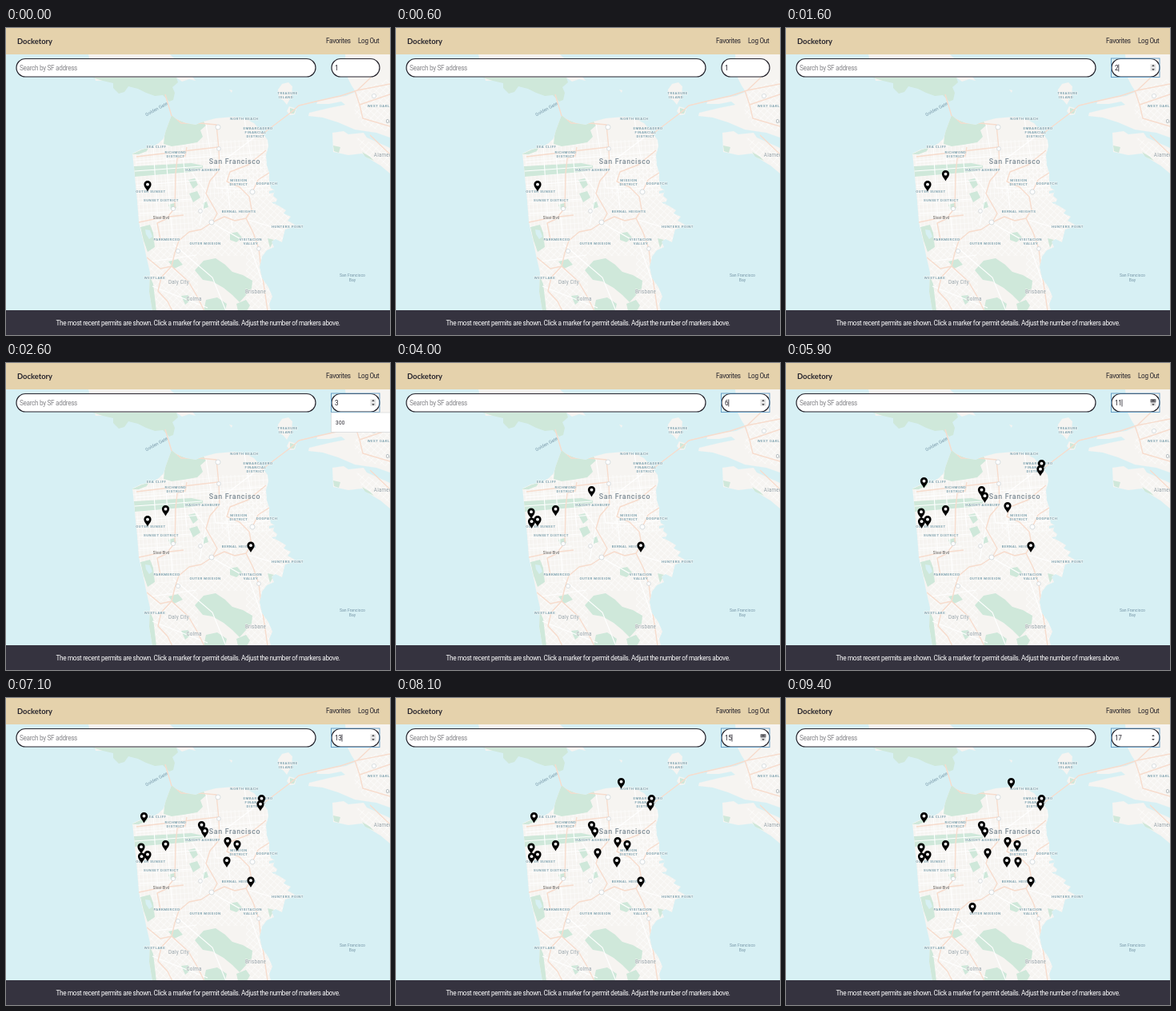
Animation, 480 px wide and 384 px high, one loop 9.5 s. Source, as an HTML page:

```html
<!DOCTYPE html>
<html lang="en">
<head>
<meta charset="utf-8">
<title>Permit map</title>
<style>
  html, body { margin: 0; width: 100%; height: 100%; overflow: hidden; background: #d7f0f4; }
  svg { display: block; width: 480px; height: 384px; font-family: Roboto, "Liberation Sans", sans-serif; }
  .land { fill: #f6f4f1; }
  .park { fill: #cfe8da; }
  .water { fill: #d7f0f4; }
  .street { fill: none; stroke: #fff; stroke-width: 1.1; }
  .road { fill: none; stroke: #f7dccd; stroke-width: 1.4; stroke-linejoin: round; }
  .shield { fill: #fff; stroke: #c3cbd0; stroke-width: .6; }
  .area { font-size: 4.4px; font-weight: 500; letter-spacing: .5px; fill: #6f97a6; }
  .town { font-size: 6.3px; letter-spacing: .2px; fill: #98a3a9; }
  .city { font-size: 8.8px; font-weight: 500; letter-spacing: .7px; fill: #7d8b95; }
  .sea { font-size: 5.1px; fill: #7797a8; }
  .halo text { text-anchor: middle; paint-order: stroke; stroke: #f8f7f5; stroke-width: .9px; }
  .halo .sea { stroke: none; }
  .field { fill: #fff; stroke: #25232c; stroke-width: 1.2; }
  .ui { font-size: 8.2px; letter-spacing: -.31px; fill: #25232c; }
  .brand { font: 700 9.4px Lato, "Open Sans", sans-serif; fill: #25232c; }
</style>
</head>
<body>
<svg viewBox="0 0 480 384" xmlns="http://www.w3.org/2000/svg">
  <defs>
    <path id="city" d="M158 157L168 152 177 150 184 148 191 144 197 138 200 128 204 117 207 109 213 114 225 119 237 121 247 117 262 113 285 111 300 114 310 119 319 129 327 140 328 148 325 159 326 172 329 181 329 192 331 200 336 203 334 210 339 214 336 220 342 223 350 228 347 232 356 236 352 241 361 246 355 250 349 252 347 259 345 268 337 264 332 267 335 274 326 278 320 286 317 299 320 313 328 324 333 336 329 345 331 354H183L179 330 180 306 175 284 171 264 166 243 164 216 161 186 159 166Z"/>
    <clipPath id="inCity"><use href="#city"/></clipPath>
    <pattern id="grid" width="5" height="7" patternUnits="userSpaceOnUse" patternTransform="rotate(-4)">
      <path d="M0 0H5M0 0V7" stroke="#fff" fill="none"/>
    </pattern>
    <pattern id="slant" width="6" height="6" patternUnits="userSpaceOnUse" patternTransform="rotate(42)">
      <path d="M0 0H6M0 0V6" stroke="#fff" fill="none"/>
    </pattern>
    <g id="pin">
      <path d="M0-.4C-1.1-3.2-4.6-5.8-4.6-9.4A4.6 4.6 0 0 1 4.6-9.4C4.6-5.8 1.1-3.2 0-.4Z"/>
      <circle cy="-9.3" r="1.9" fill="#fff"/>
    </g>
  </defs>

  <rect class="water" width="480" height="384"/>

  <!-- northern headlands and small islands -->
  <path class="land" d="M103 33H205L212 40 226 52 237 66 229 64 220 67 213 62 112 66Z"/>
  <path class="park" d="M108 62H213L215 68 208 74 211 81 209 90 204 92 196 84 186 85 175 81 165 76 153 73 148 80 141 82 134 75 134 69 121 66Z"/>
  <path class="land" d="M345 70L353 68 358 73 357 85 351 96 347 91 341 87 340 77ZM354 98L363 101 361 108 355 109 351 104ZM279 77L283 78 282 81Z"/>
  <path class="park" d="M355 100L362 102 360 107 355 107Z"/>

  <!-- east bay -->
  <path class="land" d="M424 33H480V137L463 131 449 129 436 127 415 118 396 112 378 110 379 106 404 100 424 96 419 92 404 95 388 95 390 91 404 88 425 85 437 80 432 72 427 62Z"/>
  <path class="land" d="M408 131L422 129 428 133 447 131 451 137 480 150V182L468 172 453 163 445 157 428 159 409 155Z"/>
  <path class="park" d="M409 147L418 149 416 156 410 154ZM445 155L455 161 460 166 449 161Z"/>
  <path d="M440 78L480 63V130L448 123 435 106Z" fill="url(#slant)"/>
  <path d="M438 137L480 152V176L445 155Z" fill="url(#slant)"/>

  <use href="#city" class="land"/>
  <g clip-path="url(#inCity)">
    <path d="M155 140H330V212H155ZM160 210H235V275H160Z" fill="url(#grid)"/>
    <path d="M268 160H332V212H268ZM235 212H360V285H235ZM180 275H240V354H180ZM300 285H335V354H300Z" fill="url(#slant)"/>
    <path class="park" d="M207 108L215 115 233 120 247 117 250 122 243 128 246 136 239 143 222 146 207 148 197 145 199 127Z"/>
    <path class="park" d="M157 158L170 152 178 150 176 154 166 158ZM160 173L232 169 246 172V175L232 180 161 186Z"/>
    <path class="park" d="M228 190L236 188 240 196 234 201ZM229 207L239 204 243 212 234 218ZM246 219L251 217 253 224 247 226ZM203 221L211 219 213 225 205 227Z"/>
    <path class="park" d="M168 249L180 246 184 256 186 274 177 280 172 266ZM280 257L289 255 295 262 288 268 280 265ZM327 263L335 265 330 275Z"/>
    <path class="park" d="M236 303L247 291 262 288 274 296 283 305 296 309 308 316 307 326 300 334 292 343 283 334 272 325 258 317 246 315ZM203 292L215 289 221 296 210 301ZM177 305L184 320 188 354H180ZM250 340L264 337 276 345 274 354H247Z"/>
    <path class="park" d="M219 335L228 334 230 341 224 346ZM288 345L300 340 305 347 301 354H290Z"/>
    <path class="water" d="M174 252L180 253 183 261 179 264 175 258ZM329 204L337 202 336 206 329 207ZM332 218L341 217 335 220Z"/>
    <path class="street" d="M162 168L325 155M161 179L245 173M163 197L245 190M184 148L190 243M200 160L208 265M220 150L226 205M166 218L232 214M167 232L220 229M232 180L250 205 242 247M250 120L262 200M298 114L306 162M264 172L318 131M262 200L296 202 331 196M275 185L283 250M209 270L258 312 275 354M181 292L238 284M303 240L346 253M183 323L252 350M258 244L304 270 321 319"/>
    <path class="road" d="M207 108L219 119 242 119 263 121 266 151 267 177M163 161L213 155 265 149M226 149L224 160 214 163 212 182 211 225 200 239 189 244 193 265M325 153L303 171 280 180 276 192 292 199 304 211 307 227 300 238 309 256 316 276 319 302 323 326 327 354M329 181L315 190 308 205M300 238L286 241 273 236 258 243 244 252 229 255 216 266 211 281 207 298 194 312 190 329 202 342 208 354M166 243L195 237 222 234M176 287L193 301 207 298M207 298L228 317 239 336 248 354M267 177L255 191 250 207 264 232 258 243"/>
  </g>

  <!-- bridges and east bay freeways -->
  <path class="road" d="M199 83L207 110M320 133L357 105 366 97 391 91 418 85 439 78 480 70M436 78L442 96 446 113 480 123M439 78L456 62M442 96L480 83M455 134L480 158"/>
  <g class="shield">
    <circle cx="265" cy="124" r="3"/><circle cx="308" cy="205" r="3"/><circle cx="257" cy="243" r="3"/>
    <circle cx="209" cy="226" r="2.6"/><circle cx="243" cy="229" r="2.4"/><circle cx="266" cy="151" r="2.4"/>
    <circle cx="316" cy="276" r="2.4"/><circle cx="215" cy="279" r="2.6"/><circle cx="460" cy="85" r="2.6"/>
  </g>

  <g id="labels" class="halo">
    <text class="sea" transform="translate(189 103) rotate(-29)" style="font-size:5.6px">Golden Gate</text>
    <text class="sea" x="433" y="311">San Francisco</text>
    <text class="sea" x="433" y="317">Bay</text>
    <text x="194" y="238.5" font-size="4.6" fill="#66605c">Sloat Blvd</text>
  </g>
  <g id="pins"></g>

  <rect width="480" height="33" fill="#e5d2ac"/>
  <text class="brand" x="14" y="20">Docketory</text>
  <text class="ui" x="400" y="19">Favorites</text>
  <text class="ui" x="440" y="19">Log Out</text>

  <rect class="field" x="13" y="38.5" width="374" height="22.5" rx="11.2"/>
  <text class="ui" x="17" y="53" style="fill:#858589">Search by SF address</text>
  <rect class="field" x="407" y="38.5" width="60" height="22.5" rx="11.2"/>
  <text id="count" class="ui" x="411" y="53">1</text>

  <g id="focus">
    <rect x="406.5" y="38" width="60.5" height="23.5" fill="none" stroke="#68a0c8"/>
    <rect id="button" x="455.5" y="45" width="7" height="9" rx="1" fill="#e4e4e4"/>
    <rect id="pressed" x="455.5" y="45" width="7" height="4.5" rx="1" fill="#77777c"/>
    <path d="M457.2 48L459 45.8 460.8 48ZM457.2 51L459 53.2 460.8 51Z" fill="#4b4b50"/>
  </g>
  <path id="caret" d="M0 45.5V54.5" stroke="#25232c" stroke-width=".8"/>
  <g id="menu">
    <rect x="406.5" y="62" width="80" height="24.5" fill="#fff" stroke="#d3d6d8" stroke-width=".7"/>
    <text x="412" y="76.5" font-size="6.4" letter-spacing=".3" fill="#25232c">300</text>
  </g>

  <rect y="353" width="480" height="31" fill="#35333f"/>
  <text class="ui" x="240" y="372" text-anchor="middle" style="fill:#fff">The most recent permits are shown. Click a marker for permit details. Adjust the number of markers above.</text>
</svg>
<script>
  const LOOP = 9500, FOCUS = 1100;
  const NS = "http://www.w3.org/2000/svg";
  const $ = id => document.getElementById(id);

  function add(parent, tag, attrs, text) {
    const el = document.createElementNS(NS, tag);
    for (const key in attrs) el.setAttribute(key, attrs[key]);
    if (text) el.textContent = text;
    return parent.appendChild(el);
  }

  const places = {
    area: `NORTH BEACH,298,115|EMBARCADERO,315,126.5|FINANCIAL,312,132|DISTRICT,312,137
      |SEA CLIFF,188,149.5|RICHMOND,212,156.5|DISTRICT,212,161.5|HAIGHT-ASHBURY,246,178.5
      |MISSION,291,191.5|DISTRICT,291,197|DOGPATCH,326,196|OUTER SUNSET,181,205.5
      |SUNSET DISTRICT,194,217|BERNAL HEIGHTS,291,230.5|HUNTERS POINT,352,250
      |VISITACION,306,266|VALLEY,306,271|PARKMERCED,201,266|OUTER MISSION,249,270.5
      |WESTLAKE,186,313.5|TREASURE,352,82.5|ISLAND,350,87.5|WEST OAKLAND,471,98.5`,
    town: "Daly City,216,319.5|Colma,235,341|Brisbane,312,331.5|Alameda,473,160.5|Oakland,487,118.5",
    city: "San Francisco,286,170"
  };
  for (const kind in places)
    for (const place of places[kind].split("|")) {
      const [name, x, y] = place.trim().split(",");
      add($("labels"), "text", { class: kind, x, y }, name);
    }

  // tip x, tip y, time of appearance
  const pins = [
    [177, 205, 0], [199.5, 192, 1600], [306, 237.5, 2000], [169, 195.5, 3000],
    [169.5, 207.5, 3500], [244.5, 168, 4000], [172.5, 157, 4400], [319.5, 135, 4700],
    [318, 142, 5000], [248.5, 175.5, 5400], [277, 188, 5800], [289, 192, 6200],
    [276, 212.5, 6700], [281.5, 114, 7600], [252, 202, 8000], [290, 213, 8300],
    [233, 270, 8800]
  ].map(([x, y, at]) => ({ at, y, el: add($("pins"), "use", { href: "#pin", x, y }) }));
  [...pins].sort((a, b) => a.y - b.y).forEach(p => $("pins").append(p.el));

  const show = (el, on) => { el.style.display = on ? "" : "none"; };

  function draw() {
    const t = performance.now() % LOOP;
    const shown = pins.filter(p => p.at <= t);
    const n = shown.length;
    const since = t - Math.max(FOCUS, shown[n - 1].at);
    const focused = t >= FOCUS;

    pins.forEach(p => show(p.el, p.at <= t));
    $("count").textContent = n;
    show($("focus"), focused);
    show($("button"), t < 9200);
    show($("pressed"), n > 3 && since > 50 && since < 200);
    show($("menu"), n === 3);
    show($("caret"), focused && since % 1000 < 500);
    $("caret").setAttribute("transform", `translate(${n > 9 ? 420 : 415.8} 0)`);
    requestAnimationFrame(draw);
  }
  draw();
</script>
</body>
</html>
```
